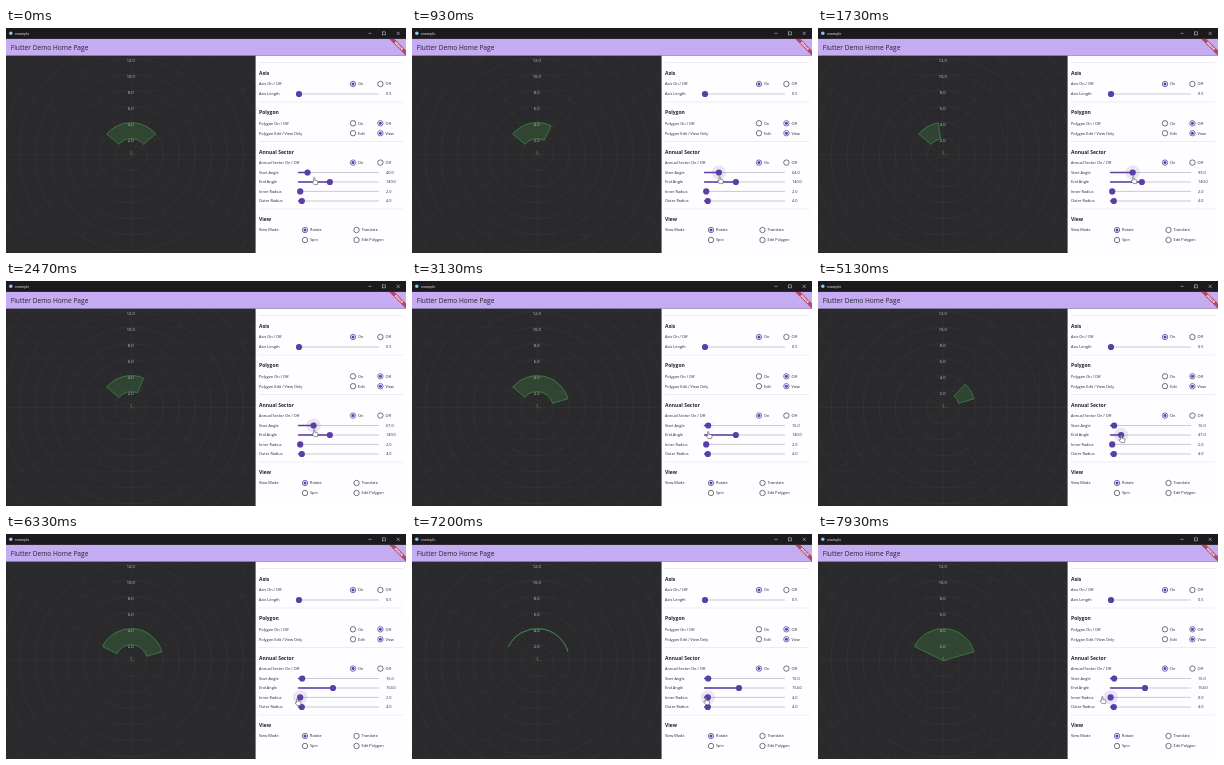
Write an HTML page that moves like this. It is 400 by 225 pixels and loops after 8000 ms.

```html
<!DOCTYPE html>
<html lang="en">
<head>
<meta charset="utf-8">
<title>Polar sector controls</title>
<style>
  html, body { margin: 0; width: 100%; height: 100%; overflow: hidden; background: #2a2a2c; }
  svg { display: block; width: 100%; height: 100%; }
  text { font-family: "Open Sans", "Noto Sans", sans-serif; fill: #25232a; }
</style>
</head>
<body>
<svg id="stage" viewBox="0 0 400 225"></svg>
<script>
const LOOP = 8000;
const PURPLE = '#5a3da6';
const BAR_TOP = 10.7, CONTENT_TOP = 27.6, PANEL_LEFT = 249.6;
const CENTER = { x: 125.2, y: 126.6 };
const UNIT = 8;
const TRACK = { left: 292.6, right: 373 };

// Keyframes: [time, value, ...]
const START = [[400, 40], [1700, 99], [2200, 99], [2900, 16]];
const END = [[3650, 140], [4470, 102], [5130, 47], [5250, 40], [5950, 154]];
const INNER = [[6600, 2], [7300, 4], [7500, 4], [7880, 0]];
const CURSOR = [
  [0, 309, 153], [400, 303, 152], [1700, 316, 152], [2200, 316, 152],
  [2900, 298, 152], [3130, 297, 154], [3650, 324, 158], [4470, 315, 158],
  [5130, 304, 158], [5250, 302, 158], [5950, 328, 158], [6330, 292, 168],
  [6600, 292, 168], [7300, 295, 167], [7500, 295, 167], [7930, 285, 166]
];
const START_HALO = [[300, 0], [450, 1], [2950, 1], [3180, 0]];
const END_HALO = [[3500, 0], [3650, 1], [6000, 1], [6150, 0]];
const INNER_HALO = [[6180, 0], [6320, 1]];

function sample(keys, time, column = 1) {
  const next = keys.findIndex(key => key[0] > time);
  if (next === 0) return keys[0][column];
  if (next < 0) return keys[keys.length - 1][column];
  const a = keys[next - 1], b = keys[next];
  return a[column] + (b[column] - a[column]) * (time - a[0]) / (b[0] - a[0]);
}

const rect = (x, y, w, h, fill) =>
  `<rect x="${x}" y="${y}" width="${w}" height="${h}" fill="${fill}"/>`;
const line = (x1, y1, x2, y2, color, width, extra = '') =>
  `<line x1="${x1}" y1="${y1}" x2="${x2}" y2="${y2}" stroke="${color}" stroke-width="${width}" ${extra}/>`;
const circle = (x, y, r, extra) => `<circle cx="${x}" cy="${y}" r="${r}" ${extra}/>`;
const text = (x, y, content, size = 3.85, extra = '') =>
  `<text x="${x}" y="${y + size * 0.36}" font-size="${size}" ${extra}>${content}</text>`;

function polar(radius, degrees) {
  const angle = degrees * Math.PI / 180;
  return [CENTER.x + radius * Math.cos(angle), CENTER.y - radius * Math.sin(angle)];
}

function grid() {
  const { x, y } = CENTER;
  let out = '';
  for (let d = -128; d <= 128; d += 16) {
    out += line(x + d, 0, x + d, 225, '#323234', 0.5) + line(0, y + d, 250, y + d, '#323234', 0.5);
  }
  for (let r = 16; r <= 176; r += 16) {
    out += circle(x, y, r, 'fill="none" stroke="#39393b" stroke-width=".5"');
  }
  for (let a = 0; a < 360; a += 30) {
    out += line(x, y, ...polar(180, a), '#343436', 0.5);
  }
  for (let value = 2; value <= 12; value += 2) {
    out += text(124.7, 128.4 - value * UNIT, value.toFixed(1), 4.1,
      'text-anchor="middle" style="fill:#d0d0d0"');
  }
  return out;
}

function section(y, title) {
  return line(252.5, y - 10, 397, y - 10, '#dedae2', 0.5)
    + text(253, y + 0.4, title, 5, 'font-weight="700"');
}

function radio(x, y, label, selected) {
  const color = selected ? PURPLE : '#4a4650';
  return circle(x, y, 2.7, `fill="none" stroke="${color}" stroke-width=".75"`)
    + (selected ? circle(x, y, 1.5, `fill="${color}"`) : '')
    + text(x + 5, y, label);
}

function radioRow(y, label, first, second, selected) {
  return text(253, y, label)
    + radio(347, y, first, selected === 0) + radio(374.4, y, second, selected === 1);
}

const trackX = (value, max) => TRACK.left + (TRACK.right - TRACK.left) * value / max;

function slider(id, y, label, value, max) {
  const x = trackX(value, max);
  return `<g id="${id}">` + text(253, y, label)
    + line(TRACK.left, y, TRACK.right, y, '#aaa6b2', 0.6)
    + line(TRACK.left, y, x, y, PURPLE, 1.6, 'class="active" stroke-linecap="round"')
    + circle(x, y, 7.2, `class="halo" fill="${PURPLE}" fill-opacity=".12" opacity="0"`)
    + circle(x, y, 3.1, `class="thumb" fill="${PURPLE}"`)
    + text(380, y, value.toFixed(1), 3.85, 'class="value"') + '</g>';
}

function titleBar() {
  return rect(0, 0, 400, BAR_TOP, '#1d1a1f')
    + circle(4.8, 5.3, 1.7, 'fill="#8cc8ee"')
    + text(9, 5.3, 'example', 3.6, 'style="fill:#eee"')
    + line(362.5, 5.4, 365.5, 5.4, '#ddd', 0.5)
    + '<rect x="376.5" y="3.9" width="3" height="3" fill="none" stroke="#ddd" stroke-width=".5"/>'
    + '<path d="M390.6 3.8l3.2 3.2m0-3.2l-3.2 3.2" stroke="#ddd" stroke-width=".5"/>';
}

function appBar() {
  return rect(0, BAR_TOP, 400, CONTENT_TOP - BAR_TOP, '#c4abf2')
    + text(4.8, 19.5, 'Flutter Demo Home Page', 6.6)
    + `<path d="M383 ${BAR_TOP}h5.1L400 22.6v5.1Z" fill="#b8446a"/>`
    + text(0, 0, 'DEBUG', 3.1,
      'font-weight="800" text-anchor="middle" transform="translate(392.8 17.9) rotate(45)" style="fill:#fff"');
}

function panel() {
  return rect(PANEL_LEFT, CONTENT_TOP, 400 - PANEL_LEFT, 225 - CONTENT_TOP, '#fefdff')
    + section(44.5, 'Axis')
    + radioRow(56, 'Axis On / Off', 'On', 'Off', 0)
    + slider('axis', 66, 'Axis Length', 0.5, 100)
    + section(84, 'Polygon')
    + radioRow(95.3, 'Polygon On / Off', 'On', 'Off', 1)
    + radioRow(105.2, 'Polygon Edit / View Only', 'Edit', 'View', 1)
    + section(123.5, 'Annual Sector')
    + radioRow(134.6, 'Annual Sector On / Off', 'On', 'Off', 0)
    + slider('start', 144.5, 'Start Angle', 40, 360)
    + slider('end', 154, 'End Angle', 140, 360)
    + slider('inner', 163.4, 'Inner Radius', 2, 100)
    + slider('outer', 173, 'Outer Radius', 4, 100)
    + section(191, 'View')
    + text(253, 202, 'View Mode')
    + radio(299, 202, 'Rotate', true) + radio(350.5, 202, 'Translate', false)
    + radio(299, 212, 'Spin', false) + radio(350.5, 212, 'Edit Polygon', false);
}

const stage = document.getElementById('stage');
stage.innerHTML = rect(0, 0, 250, 225, '#2a2a2c') + grid()
  + line(CENTER.x, CENTER.y, CENTER.x + 4, CENTER.y, '#70443f', 0.5)
  + line(CENTER.x, CENTER.y, CENTER.x, CENTER.y - 4, '#4d9a50', 0.6)
  + '<path id="sector" fill="#4caf50" fill-opacity=".2" stroke="#3f8745" stroke-width=".75" stroke-linejoin="round"/>'
  + panel() + appBar() + titleBar()
  + `<path id="cursor" fill="#fff" stroke="#333" stroke-width=".5" stroke-linejoin="round"
      d="M-1.3 .6V-3.2q.6-1 1.2 0V-.7l2.4.5q.8.3.7 1.1L2.5 3.6H-.9L-2.9 1q.2-1 1.6-.4Z"/>`;

const sector = document.getElementById('sector');
const cursor = document.getElementById('cursor');

function setSlider(id, value, max, halo) {
  const group = document.getElementById(id);
  const x = trackX(value, max);
  group.querySelector('.active').setAttribute('x2', x);
  group.querySelector('.thumb').setAttribute('cx', x);
  group.querySelector('.halo').setAttribute('cx', x);
  group.querySelector('.halo').setAttribute('opacity', halo);
  group.querySelector('.value').textContent = value.toFixed(1);
}

function sectorPath(start, end, inner, outer) {
  const r = inner * UNIT, R = outer * UNIT;
  const large = end - start > 180 ? 1 : 0;
  return `M${polar(R, start)}A${R} ${R} 0 ${large} 0 ${polar(R, end)}`
    + `L${polar(r, end)}A${r} ${r} 0 ${large} 1 ${polar(r, start)}Z`;
}

function draw(now) {
  const time = now % LOOP;
  const start = Math.round(sample(START, time));
  const end = Math.round(sample(END, time));
  const inner = Math.round(sample(INNER, time));
  setSlider('start', start, 360, sample(START_HALO, time));
  setSlider('end', end, 360, sample(END_HALO, time));
  setSlider('inner', inner, 100, sample(INNER_HALO, time));
  sector.setAttribute('d', sectorPath(start, end, inner, 4));
  cursor.setAttribute('transform', `translate(${sample(CURSOR, time)} ${sample(CURSOR, time, 2)})`);
  requestAnimationFrame(draw);
}
draw(0);
</script>
</body>
</html>
```
